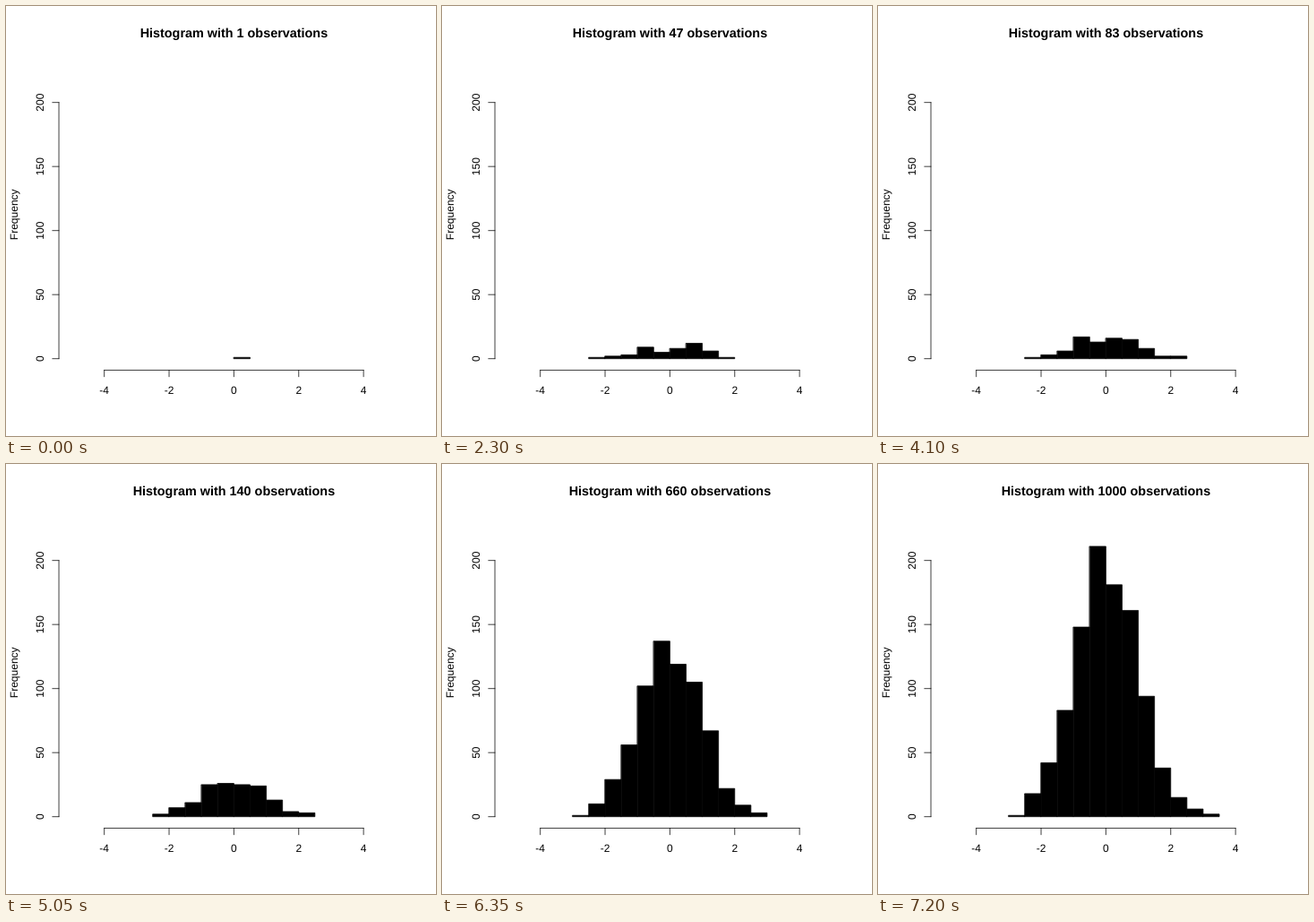
Animation of 480 by 480 pixels, one loop 7250 ms. Source, as an HTML page:

```html
<!DOCTYPE html>
<html lang="en">
<head>
<meta charset="utf-8">
<title>Growing histogram</title>
<style>
  html, body { margin: 0; width: 100%; height: 100%; overflow: hidden; background: #fff; }
  svg { display: block; width: 480px; height: 480px; }
  text {
    font: 12px "Liberation Sans", Arial, sans-serif;
    text-anchor: middle;
    text-rendering: geometricPrecision;
  }
  #title { font-size: 14.4px; font-weight: bold; }
  path { stroke: #000; stroke-width: .75; stroke-linecap: round; stroke-linejoin: round; }
  #axes path { fill: none; }
</style>
</head>
<body>
<svg viewBox="0 0 480 480">
  <text id="title" x="254.4" y="34.8"></text>
  <g id="axes"></g>
  <g id="bars"></g>
</svg>
<script>
  const STEP = 50, FRAMES = 145;
  const LEFT = 59.04, BOTTOM = 406.56, TICK = 7.2;
  const BIN = 0.5, FIRST = -3, BINS = 13;
  const xAt = v => 254.4 + v * 390.72 / 10.8;
  const yAt = c => 393.69 - c * 347.52 / 1.08 / 225;

  // Bin counts at a few sample sizes: left edge of the first bin, then counts.
  const stages = [
    [0, 1],
    [-1.5, 1, 3, 3, 3, 5, 1],
    [-2, 1, 1, 4, 4, 4, 7, 2, 1],
    [-2, 2, 2, 5, 4, 5, 9, 3, 1],
    [-2.5, 1, 2, 3, 9, 5, 8, 12, 6, 1],
    [-2.5, 1, 2, 5, 12, 8, 11, 13, 7, 1, 1],
    [-2.5, 1, 3, 6, 17, 13, 16, 15, 8, 2, 2],
    [-2.5, 1, 4, 7, 18, 14, 17, 16, 9, 3, 2],
    [-3, 1, 3, 11, 17, 36, 45, 39, 36, 20, 7, 4, 1],
    [-3, 1, 6, 20, 31, 61, 87, 70, 65, 36, 13, 7, 3],
    [-3, 1, 10, 29, 56, 102, 137, 119, 105, 67, 22, 9, 3],
    [-3, 1, 18, 42, 83, 148, 211, 181, 161, 94, 38, 15, 6, 2]
  ];

  // Each bin's new observations are spread evenly between two stages.
  function listDraws() {
    const draws = [];
    let prev = Array(BINS).fill(0);
    for (const [edge, ...counts] of stages) {
      const offset = (edge - FIRST) / BIN;
      const next = prev.map((_, b) => counts[b - offset] || 0);
      const added = [];
      next.forEach((count, b) => {
        const extra = count - prev[b];
        for (let i = 0; i < extra; i++) added.push({ b, at: (i + 0.5) / extra });
      });
      added.sort((p, q) => p.at - q.at);
      draws.push(...added.map(d => d.b));
      prev = next;
    }
    return draws;
  }

  function add(parent, name, attrs, text = "") {
    const el = document.createElementNS("http://www.w3.org/2000/svg", name);
    for (const key in attrs) el.setAttribute(key, attrs[key]);
    el.textContent = text;
    return parent.appendChild(el);
  }

  const title = document.getElementById("title");
  const axes = document.getElementById("axes");
  const barGroup = document.getElementById("bars");

  const line = d => add(axes, "path", { d });
  const label = (x, y, text) => add(axes, "text", { x, y }, text);
  const sideLabel = (x, y, text) =>
    add(axes, "text", { transform: `translate(${x} ${y}) rotate(-90)` }, text);

  line(`M${xAt(-4)} ${BOTTOM}H${xAt(4)}`);
  for (let v = -4; v <= 4; v += 2) {
    line(`M${xAt(v)} ${BOTTOM}v${TICK}`);
    label(xAt(v), 432.8, v);
  }
  line(`M${LEFT} ${yAt(0)}V${yAt(200)}`);
  for (let c = 0; c <= 200; c += 50) {
    line(`M${LEFT} ${yAt(c)}h${-TICK}`);
    sideLabel(41.76, yAt(c), c);
  }
  sideLabel(12.96, 232.8, "Frequency");

  const draws = listDraws();
  const bars = Array.from({ length: BINS }, () => add(barGroup, "path", {}));

  function show(n) {
    title.textContent = `Histogram with ${n} observations`;
    const counts = Array(BINS).fill(0);
    for (let i = 0; i < n; i++) counts[draws[i]]++;
    const lo = counts.findIndex(c => c > 0);
    const hi = counts.findLastIndex(c => c > 0);
    bars.forEach((bar, b) => {
      const x = xAt(FIRST + b * BIN), right = xAt(FIRST + (b + 1) * BIN);
      const inside = b >= lo && b <= hi;
      bar.setAttribute("d", inside
        ? `M${x} ${yAt(0)}H${right}V${yAt(counts[b])}H${x}Z` : "");
    });
  }

  // One observation per step up to 100, then twenty per step.
  const sizeAt = k => k < 100 ? k + 1 : 100 + 20 * (k - 99);

  const start = performance.now();
  let shown = -1;
  function tick() {
    const k = Math.floor((performance.now() - start) / STEP) % FRAMES;
    if (k !== shown) show(sizeAt(shown = k));
    requestAnimationFrame(tick);
  }
  tick();
</script>
</body>
</html>
```
